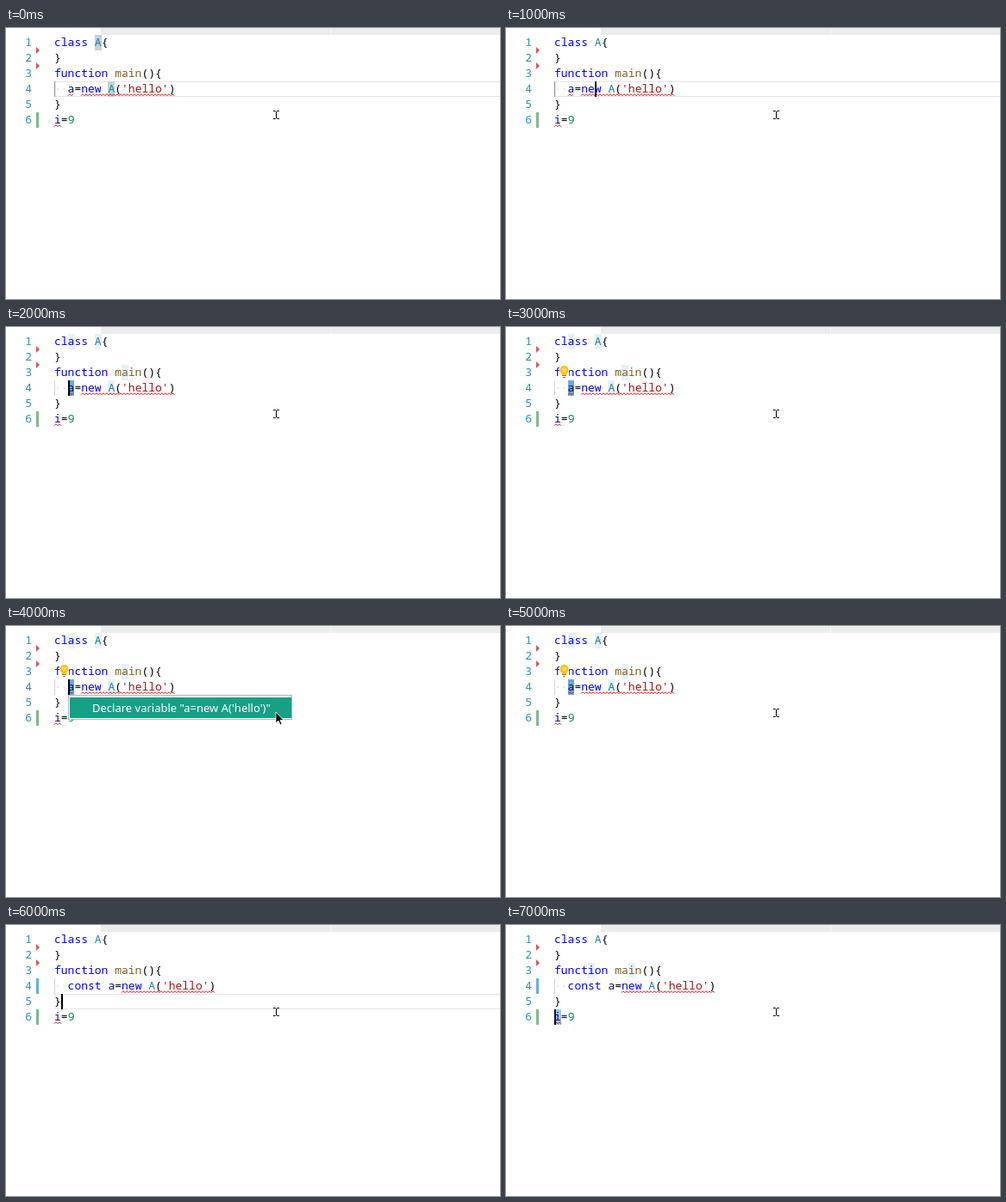
An HTML page for the animation above (8 s loop, 573 by 315 pixels).

```html
<!DOCTYPE html>
<html lang="en">
<head>
<meta charset="utf-8">
<style>
html, body { margin: 0; width: 100%; height: 100%; overflow: hidden; background: #fff; }
svg { display: block; }
text { white-space: pre; font: 13px "Noto Sans Mono", monospace; }
.menu { font-family: "Noto Sans", sans-serif; }
</style>
</head>
<body>
<svg id="stage" width="573" height="315"></svg>
<script>
const LEFT = 56, CHAR = 7.8, ROW = 18;
const KEY = '#0000ff', TYPE = '#267f99', FUNC = '#795e26', STR = '#a31515',
      NUM = '#098658', VAR = '#001080', TEXT = '#000';
const PALE = '#e6f1fb', WORD = '#c0d3dc', STRONG = '#69a8db', SELECTED = '#9fc5f3';

const colX = col => LEFT + col * CHAR;
const rowY = row => 8 + (row - 1) * ROW;
const rect = (x, y, w, h, fill) =>
  `<rect x="${x}" y="${y}" width="${w}" height="${h}" fill="${fill}"/>`;
const path = (d, attrs) => `<path d="${d}" ${attrs}/>`;

// Each line is a list of alternating colour and text.
function codeLine(row, ...parts) {
  let spans = '';
  for (let i = 0; i < parts.length; i += 2)
    spans += `<tspan fill="${parts[i]}">${parts[i + 1]}</tspan>`;
  return `<text x="${LEFT}" y="${rowY(row) + 13}">${spans}</text>` +
    `<text x="30" y="${rowY(row) + 13}" text-anchor="end" fill="#2b91af">${row}</text>`;
}

const mark = (row, col, fill) =>
  rect(Math.round(colX(col)), rowY(row), 8, ROW, fill);

const caret = (row, col) => rect(Math.round(colX(col)), rowY(row), 2, ROW, '#000');

function squiggle(row, col, length) {
  const start = Math.round(colX(col)), end = Math.round(colX(col + length));
  let d = '';
  for (let x = start, i = 0; x <= end; x += 2, i++)
    d += `${i ? 'L' : 'M'}${x} ${rowY(row) + (i % 2 ? 14.7 : 16.7)}`;
  return path(d, 'fill="none" stroke="#e01010"');
}

const currentLine = row =>
  `<rect x="57" y="${rowY(row) + .5}" width="530" height="17" fill="none" stroke="#e4e4e4"/>`;

const triangle = y => path(`M35 ${y - 4}l4 4l-4 4z`, 'fill="#ca5a5f"');

const bulb = () => rect(62, 45, 11, 14, '#fff') +
  path('M67.5 45a5 5 0 0 1 3 9v2h-6v-2a5 5 0 0 1 3-9z', 'fill="#fcc419"') +
  path('M65 49h5M66 51h3', 'stroke="#fff3c4"') +
  path('M65 56.5h5M66 58.5h3', 'stroke="#777"');

const beam = () =>
  path('M310 96.5h2.5l1 1l1-1h2.5M313.5 97v8M310 105.5h2.5l1-1l1 1h2.5',
    'fill="none" stroke="#000"');

const menu = () => rect(72.5, 80.5, 259, 28, '#fff" stroke="#b5b5b5') +
  rect(74, 83, 257, 24, '#16a085') +
  `<text class="menu" x="100" y="100" fill="#fff">Declare variable "a=new A('hello')"</text>` +
  path('M313 100v13l3-3l2 5l2-1l-2-4.5h4z', 'fill="#000" stroke="#fff" stroke-width=".8"');

function draw(step) {
  const picking = step >= 2 && step <= 5, declared = step >= 6;
  let out = rect(0, 0, 573, 315, '#fff') + rect(110, 0, 463, 8, '#ececec') +
    rect(376, 0, 1, 8, '#f7f7f7');

  if (step < 2) out += currentLine(4);
  if (step === 6) out += currentLine(5);
  if (step === 0) out += mark(1, 6, WORD) + mark(4, 8, WORD);
  if (picking) {
    out += mark(1, 2, PALE) + mark(1, 6, PALE) + mark(3, 10, PALE) +
      mark(4, 8, PALE) + rect(72, 62, 7, ROW, STRONG);
  }
  if (step === 7) out += mark(3, 5, PALE) + mark(3, 11, PALE) + mark(6, 0, SELECTED);

  out += rect(56, 62, 1, ROW, step < 2 ? '#939393' : '#d3d3d3') +
    triangle(26) + triangle(44) + rect(35, 98, 3, ROW, '#81b88b');
  if (declared) out += rect(35, 62, 3, ROW, '#66afe0');

  out += codeLine(1, KEY, 'class ', TYPE, 'A', TEXT, '{') +
    codeLine(2, TEXT, '}') +
    codeLine(3, KEY, 'function ', FUNC, 'main', TEXT, '(){') +
    codeLine(4, '#d6d6d6', '··', KEY, declared ? 'const ' : '', VAR, 'a', TEXT, '=',
      KEY, 'new ', TYPE, 'A', TEXT, '(', STR, "'hello'", TEXT, ')') +
    codeLine(5, TEXT, '}') +
    codeLine(6, VAR, 'i', TEXT, '=', NUM, '9');

  out += squiggle(6, 0, 1) + squiggle(4, declared ? 10 : 4, 14);
  if (!declared) out += squiggle(4, 2, 1);

  if (step === 1) out += caret(4, 6);
  if (step === 2 || step === 4) out += caret(4, 2);
  if (step === 6) out += caret(5, 1);
  if (step === 7) out += caret(6, 0);
  if (step >= 3 && step <= 5) out += bulb();
  return out + (step === 4 ? menu() : beam());
}

const stage = document.getElementById('stage');
let shown = -1;
function tick() {
  const step = Math.floor(performance.now() % 8000 / 1000);
  if (step !== shown) stage.innerHTML = draw(shown = step);
  requestAnimationFrame(tick);
}
tick();
</script>
</body>
</html>
```
